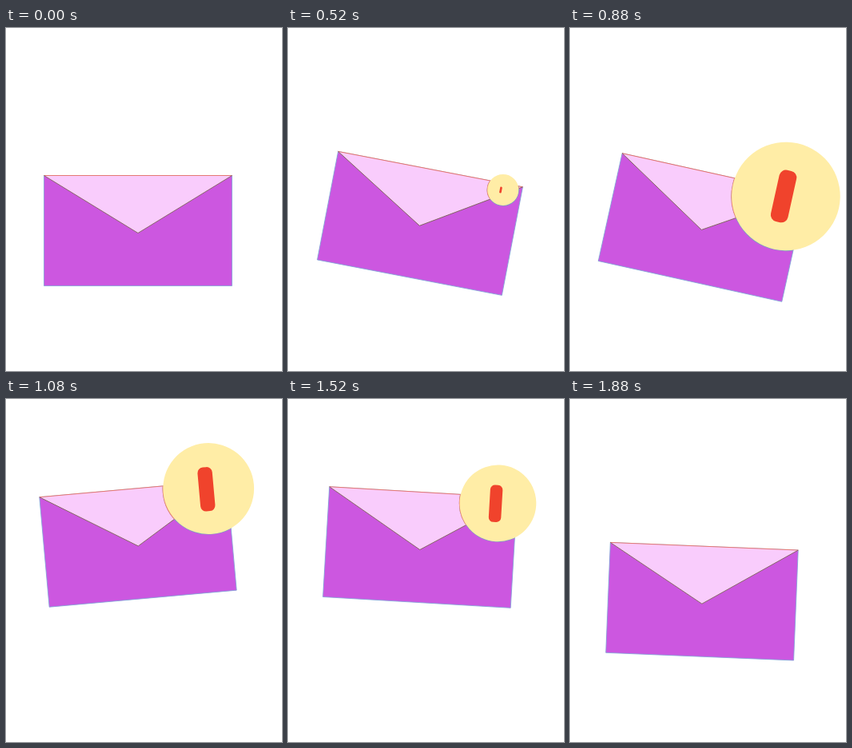
An HTML page with a canvas for the animation above (1920 ms loop, 345 by 429 pixels).

```html
<!DOCTYPE html>
<html lang="en">
<head>
<meta charset="utf-8">
<title>Envelope with alert badge</title>
<style>
html, body { margin: 0; width: 100%; height: 100%; overflow: hidden; background: #fff; }
canvas { display: block; }
</style>
</head>
<body>
<canvas id="stage" width="345" height="429"></canvas>
<script>
const ctx = document.getElementById('stage').getContext('2d');
const LOOP = 1920, STEP = 40, TILT = 12.5;

// Cosine easing from each [ms, value] turning point to the next.
const swing = (...turns) => t => {
  const next = turns.findIndex(([time]) => time > t);
  if (next < 0) return turns[turns.length - 1][1];
  if (next === 0) return turns[0][1];
  const [t0, v0] = turns[next - 1], [t1, v1] = turns[next];
  return v0 + (v1 - v0) * (1 - Math.cos(Math.PI * (t - t0) / (t1 - t0))) / 2;
};

const angle = swing([0, 0], [240, -TILT], [485, TILT], [700, -TILT], [880, TILT],
  [1195, -TILT], [1257, -TILT], [1705, TILT], [1950, 0]);
const height = swing([0, 253.5], [490, 242], [700, 290], [1145, 175], [1415, 177], [1900, 253.5]);
const radius = swing([427, 0], [700, 75], [1120, 56.5], [1400, 52.3], [1530, 47.8],
  [1595, 56], [1720, 0]);

const body = new Path2D('M-117.5-69H117.5V69H-117.5Z');
const flap = new Path2D('M-117.5-69H117.5L0 3Z');
const folds = new Path2D('M-117.5-69L0 3L117.5-69');
const topEdge = new Path2D('M-117.5-69H117.5');

function fill(path, color) {
  ctx.fillStyle = color;
  ctx.fill(path);
}

function line(path, color, width) {
  ctx.strokeStyle = color;
  ctx.lineWidth = width;
  ctx.stroke(path);
}

function rimInside(area, rim, color) {
  ctx.save();
  ctx.clip(area);
  line(rim, color, 1.4);
  ctx.restore();
}

function drawBadge(r) {
  const disc = new Path2D(), bar = new Path2D();
  disc.arc(94, -60.8, r, 0, 2 * Math.PI);
  rimInside(body, disc, '#7d9fc0');
  rimInside(flap, disc, '#f08470');
  fill(disc, '#ffeda6');
  // The bar lags behind the disc while it is small.
  const length = 0.97 * r * Math.min(1, r / 47), width = length / 3;
  bar.roundRect(91.2 - width / 2, -60.2 - length / 2, width, length, width * 0.38);
  fill(bar, '#f0432c');
}

function draw(t) {
  ctx.fillStyle = '#fff';
  ctx.fillRect(0, 0, 345, 429);
  ctx.save();
  ctx.translate(165, height(t));
  ctx.rotate(angle(t) * Math.PI / 180);
  fill(body, '#cc57e0');
  line(body, '#7fa4d8', 0.8);
  fill(flap, '#f9ccfc');
  line(topEdge, '#ec6a55', 0.8);
  line(folds, '#80645c', 0.9);
  const r = radius(t);
  if (r > 0) drawBadge(r);
  ctx.restore();
}

const start = performance.now();
function tick() {
  const t = (performance.now() - start) % LOOP;
  draw(Math.floor(t / STEP) * STEP);
  requestAnimationFrame(tick);
}
tick();
</script>
</body>
</html>
```
